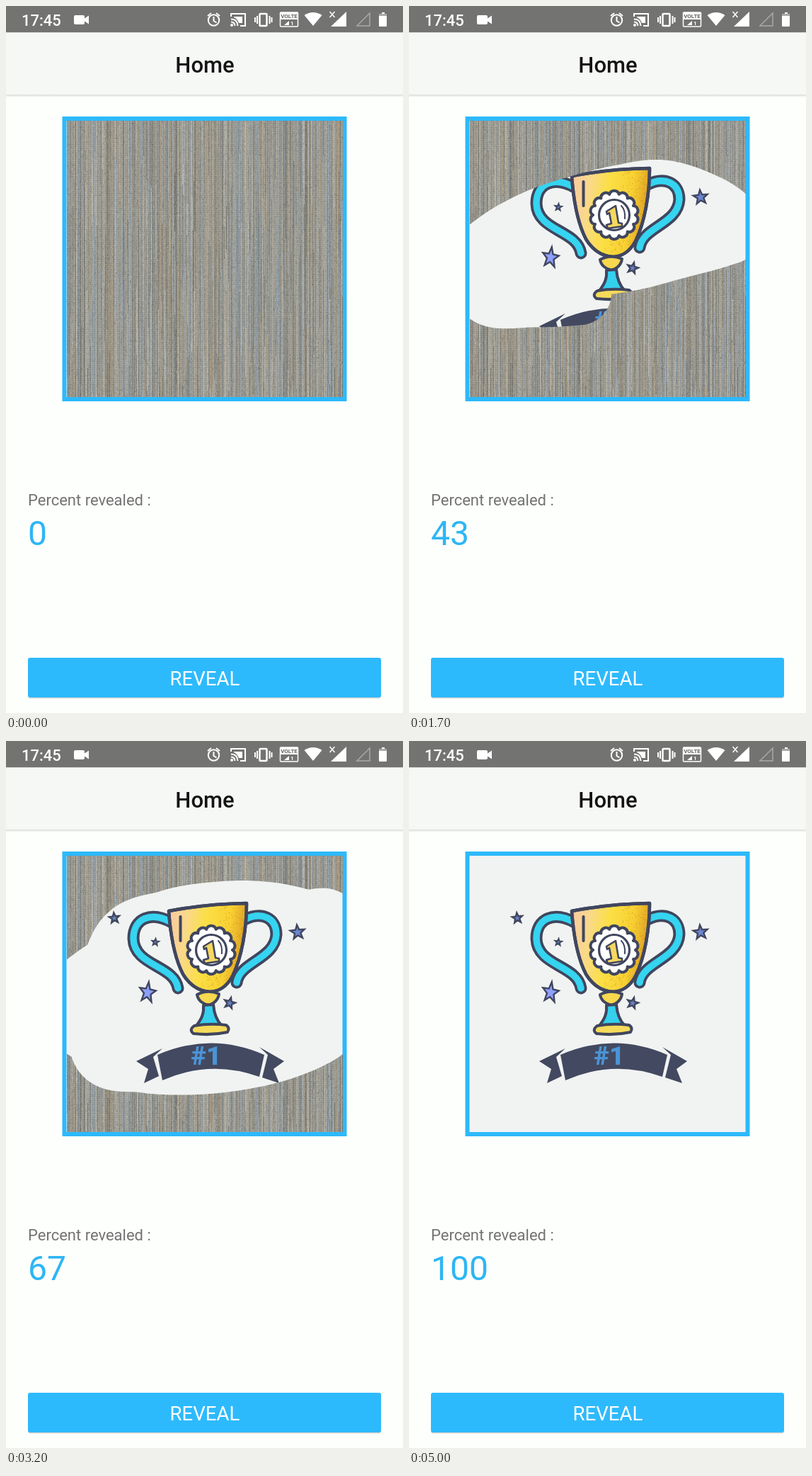
Animation, 561 px wide and 998 px high, one loop 5100 ms. Source, as an HTML page with a canvas:

```html
<!DOCTYPE html>
<html lang="en">
<head>
<meta charset="utf-8">
<title>Scratch card</title>
<style>
  html, body { margin: 0; width: 100%; height: 100%; overflow: hidden; background: #fdfffc; }
  svg, canvas { position: absolute; left: 0; top: 0; display: block; }
  canvas { left: 86px; top: 162px; }
  text { font-family: Roboto, sans-serif; }
  .ink { stroke: #40465e; stroke-width: 4.5; stroke-linejoin: round; stroke-linecap: round; }
</style>
</head>
<body>
<svg width="561" height="998" viewBox="0 0 561 998">
  <defs>
    <linearGradient id="gold" x2="1" y2=".15">
      <stop offset="0" stop-color="#f8c8a4"/><stop offset=".25" stop-color="#f9d98a"/>
      <stop offset=".5" stop-color="#fbdf45"/><stop offset=".8" stop-color="#f8d032"/>
      <stop offset="1" stop-color="#e0a325"/>
    </linearGradient>
    <linearGradient id="shade" x2="0" y2="1">
      <stop offset="0" stop-color="#000" stop-opacity=".13"/><stop offset="1" stop-color="#000" stop-opacity="0"/>
    </linearGradient>
    <path id="cup" d="M230 240Q282 230 340 229C340 266 333 306 320 332Q308 354 287 354Q264 352 250 329Q234 298 230 240Z"/>
    <clipPath id="cupClip"><use href="#cup"/></clipPath>
  </defs>

  <!-- Status bar -->
  <rect width="561" height="37.500" fill="#737472"/>
  <text x="22" y="27.500" font-size="22" font-weight="500" fill="#fff">17:45</text>
  <g fill="#fff">
    <path d="M98 13h11q2 0 2 2v2.500l6-4v12l-6-4v2.500q0 2-2 2h-11q-2 0-2-2v-9q0-2 2-2z"/>
    <path d="M434 28L421.500 13Q434 5 446.500 13Z"/>
    <path d="M481 8v21h-22z"/>
    <path d="M529 11h2V9h4v2h2q1 0 1 1v16q0 1-1 1h-9q-1 0-1-1V12q0-1 2-1z"/>
  </g>
  <path d="M527 11h11v3h-11z" fill="#aaa"/>
  <g fill="none" stroke="#fff" stroke-width="2">
    <circle cx="293.500" cy="20" r="7.700"/>
    <path d="M293.500 15v6l4 2.500M285 14l5-4M302 14l-5-4"/>
    <path d="M318 15v-4h20v17h-7M318 18.500q9 0 9.500 9.500M318 22.500q5 0 5.500 5.500"/>
    <path d="M322 15h12v9h-5q-2-6-7-8z" fill="#fff" stroke="none"/>
    <circle cx="319" cy="27" r="1"/>
    <rect x="358.500" y="11" width="10" height="17" rx="1" stroke-width="2.500"/>
    <path d="M355 14v11M352 16v7M372.500 14v11M375.500 16v7"/>
    <rect x="387.500" y="9" width="25" height="20" rx="1" stroke-width="1.500"/>
    <path d="M457.500 8l7 8M464.500 8l-7 8" stroke-width="1.500"/>
    <path d="M514 10v18h-18z" stroke="#a9aaa8" stroke-width="1.500"/>
  </g>
  <path d="M388 9h24v10h-24z" fill="#fff"/>
  <text x="400" y="17.200" text-anchor="middle" font-size="8" font-weight="700" fill="#666">VOLTE</text>
  <path d="M400 21v6h-7z" fill="#fff"/>
  <text x="402" y="27" font-size="8" font-weight="700" fill="#fff">1</text>

  <!-- Header -->
  <rect y="37.500" width="561" height="88" fill="#f6f8f5"/>
  <rect y="125" width="561" height="4" fill="url(#shade)"/>
  <text x="281" y="93.500" text-anchor="middle" font-size="31" font-weight="500" fill="#141414">Home</text>

  <!-- Card -->
  <rect x="82.500" y="159" width="396" height="396" fill="#f1f3f2" stroke="#2db9fb" stroke-width="6"/>

  <g fill="none" stroke-linecap="round">
    <g id="handles">
      <path d="M234 256C205 240 180 250 180 279C181 318 238 316 243 349"/>
      <path d="M337 252C362 240 382 250 382 273C380 308 330 312 326 341"/>
    </g>
    <use href="#handles" stroke="#40465e" stroke-width="17"/>
    <use href="#handles" stroke="#35d4f0" stroke-width="9.500"/>
  </g>
  <g class="ink">
    <use href="#cup" fill="url(#gold)"/>
    <path id="grain" clip-path="url(#cupClip)" fill="none" stroke="#b97a16" stroke-width="1.200" stroke-opacity=".55"/>
    <use href="#cup" fill="none"/>
    <path d="M246.500 248v34" stroke-width="4"/>
    <path id="badge" fill="#fff" stroke-width="4"/>
    <circle cx="290" cy="295" r="21.500" fill="#fff" stroke-width="3.200"/>
    <path d="M279 290L292 282L296 306L301 307V311L281 314L279 309L286 307L283 292L280 294Z" fill="#f5d860" stroke-width="2.600"/>
    <path d="M300 282Q306 288 305 300" fill="none" stroke-width="2"/>
    <path d="M270 358Q285 350 301 357C300 366 292 372 286 373C278 371 271 366 270 358Z" fill="#f8d84e" stroke-width="4"/>
    <path d="M279 373L293 372C294 385 297 394 305 402L268 403C277 392 280 384 279 373Z" fill="#35d0ee" stroke-width="4"/>
    <path d="M266 402Q288 398 311 401Q317 405 313 411Q290 416 265 413Q258 408 266 402Z" fill="#f6da5a" stroke-width="4"/>
  </g>
  <g id="stars" stroke="#40465e" stroke-linejoin="miter"></g>
  <g fill="#434960">
    <path d="M214 443Q290 410 365 443L358 474Q289 449 221 479Z"/>
    <path d="M221 434L184 452L201 463L195 483L216 473L208 446Z"/>
    <path d="M358 432L393 452L378 463L386 483L362 475L370 443Z"/>
  </g>
  <text x="283" y="457" text-anchor="middle" font-size="37" font-weight="900" fill="#4a94d6">#1</text>

  <!-- Counter and button -->
  <text x="31" y="705" font-size="22" fill="#727372">Percent revealed :</text>
  <text id="percent" x="31" y="760.500" font-size="48" fill="#2db6f5">0</text>
  <rect x="31" y="922" width="499" height="56" rx="4" fill="#000" opacity=".07"/>
  <rect x="31" y="921" width="499" height="56" rx="3" fill="#000" opacity=".13"/>
  <rect x="31" y="920" width="499" height="56" rx="3" fill="#2dbafd"/>
  <text x="281" y="959" text-anchor="middle" font-size="27.600" fill="#fff">REVEAL</text>
</svg>
<canvas id="cover" width="390" height="390"></canvas>

<script>
const SIZE = 390, BRUSH = 93, LOOP = 5100, REVEAL_AT = 4800;
const byId = id => document.getElementById(id);

let seed = 7;
const random = () => (seed = seed * 16807 % 2147483647) / 2147483647;
const polar = (cx, cy, r, a, squash = 1) =>
  `${(cx + r * squash * Math.cos(a)).toFixed(1)} ${(cy + r * Math.sin(a)).toFixed(1)}`;

// Scalloped badge: each lobe is an arc between points on a circle.
const LOBES = 14;
let badge = "M" + polar(290, 295, 30, 0);
for (let i = 1; i <= LOBES; i++) badge += `A7 7 0 0 1 ${polar(290, 295, 30, i * 2 * Math.PI / LOBES)}`;
byId("badge").setAttribute("d", badge + "Z");

let grain = "";
for (let i = 0; i < 260; i++) {
  const x = 340 - 38 * random() ** 2, y = 230 + 118 * random();
  grain += `M${(x - Math.max(0, y - 270) * .35).toFixed(1)} ${y.toFixed(1)}h.1`;
}
byId("grain").setAttribute("d", grain);

function star(x, y, r, tilt, fill, squash) {
  const points = Array.from({ length: 10 }, (_, i) =>
    polar(x, y, i % 2 ? r * .42 : r, tilt + (i / 5 - .5) * Math.PI, squash));
  return `<path d="M${points.join("L")}Z" fill="${fill}" stroke-width="${r > 7 ? 2.4 : 2}"/>`;
}
byId("stars").innerHTML =
  star(153, 250, 7.5, -.1, "#6683c4") + star(412, 270, 10.5, -.1, "#6b86d0") +
  star(211, 284, 5, .1, "#6683c4") + star(200, 355, 15, .15, "#8d9ffb", .8) +
  star(316, 370, 8, .25, "#6683c4");

// Woven cover: vertical threads in long runs, then specks and faint cross threads.
function makeWeave() {
  const weave = document.createElement("canvas");
  weave.width = weave.height = SIZE;
  const g = weave.getContext("2d");
  const tones = [[163, 154, 136], [146, 156, 161], [174, 173, 164], [134, 133, 125], [156, 154, 145]];
  const pickTone = () => tones[Math.floor(random() * tones.length)];
  for (let x = 0; x < SIZE; x++) {
    const main = pickTone(), shift = (random() - .5) * 16;
    for (let y = 0; y < SIZE;) {
      const length = 40 + random() * 130;
      const tone = random() < .7 ? main : pickTone();
      const light = shift + (random() - .5) * 14;
      g.fillStyle = `rgb(${tone.map(c => Math.round(c + light))})`;
      g.fillRect(x, Math.floor(y), 1, length + 2);
      y += length;
    }
  }
  for (let i = 0; i < 24000; i++) {
    g.fillStyle = random() < .5 ? "rgba(60,60,55,.13)" : "rgba(235,235,225,.12)";
    g.fillRect(Math.floor(random() * SIZE), Math.floor(random() * SIZE), 1, 2);
  }
  g.fillStyle = "rgba(60,60,55,.06)";
  for (let y = 0; y < SIZE; y += 3) g.fillRect(0, y, SIZE, 1);
  return weave;
}

// Finger positions, one per moving step: x, y, percent shown.
const trail = [
  [153, 366, 4], [195, 366, 7], [250, 364, 11], [315, 355, 15], [380, 338, 19],
  [436, 323, 21], [455, 312, 22], [424, 286, 24], [360, 264, 25], [298, 271, 27],
  [235, 287, 29], [180, 306, 32], [128, 335, 35], [100, 365, 37], [115, 405, 39],
  [175, 407, 41], [240, 404, 43], [300, 395, 45], [370, 378, 46], [445, 360, 49],
  [455, 398, 52], [390, 432, 55], [293, 451, 58], [195, 450, 60], [136, 428, 61],
  [165, 290, 62], [230, 257, 63], [300, 245, 65], [365, 245, 66], [420, 256, 67],
  [455, 272, 67], [380, 440, 69], [265, 481, 71], [163, 497, 72]
];

function spline(a, b, c, d, u) {
  return b + u / 2 * (c - a + u * (2 * a - 5 * b + 4 * c - d + u * (3 * (b - c) + d - a)));
}

const weave = makeWeave();
const ctx = byId("cover").getContext("2d");

function drawCover(count) {
  ctx.globalCompositeOperation = "source-over";
  ctx.drawImage(weave, 0, 0);
  if (!count) return;
  ctx.globalCompositeOperation = "destination-out";
  ctx.lineWidth = BRUSH;
  ctx.lineCap = ctx.lineJoin = "round";
  ctx.save();
  ctx.translate(-86, -162);
  ctx.beginPath();
  ctx.moveTo(trail[0][0], trail[0][1]);
  ctx.lineTo(trail[0][0], trail[0][1]);
  for (let i = 0; i < count - 1; i++) {
    const near = [-1, 0, 1, 2].map(k => trail[Math.min(Math.max(i + k, 0), trail.length - 1)]);
    for (let s = 1; s <= 12; s++) {
      const [x, y] = [0, 1].map(axis => spline(...near.map(p => p[axis]), s / 12));
      ctx.lineTo(x, y);
    }
  }
  ctx.stroke();
  ctx.restore();
}

// The finger rests at 2.6 s and from 3.3 to 3.4 s.
function stepsAt(time) {
  const n = Math.floor(time / 100);
  const rests = (n > 25 ? 1 : 0) + Math.min(Math.max(n - 32, 0), 2);
  return Math.min(n - rests, trail.length);
}

let shown = -1;
function render(now) {
  const time = now % LOOP, revealed = time >= REVEAL_AT;
  const state = revealed ? 100 : stepsAt(time);
  if (state !== shown) {
    shown = state;
    if (revealed) ctx.clearRect(0, 0, SIZE, SIZE);
    else drawCover(state);
    byId("percent").textContent = revealed ? 100 : state ? trail[state - 1][2] : 0;
  }
}

const start = performance.now();
function tick() {
  render(performance.now() - start);
  requestAnimationFrame(tick);
}
tick();
</script>
</body>
</html>
```
